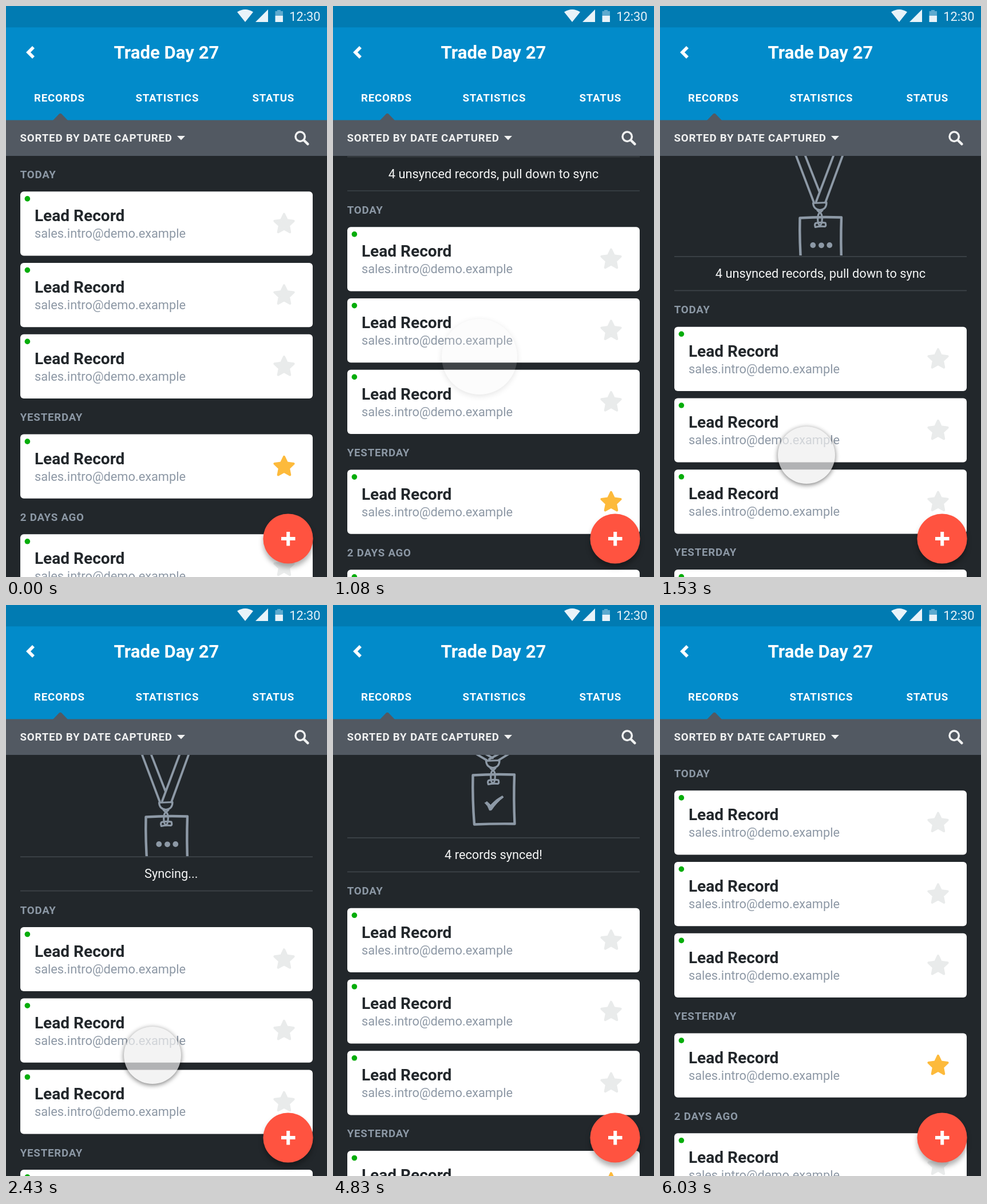
Recreate the animation shown at these times as an HTML page. Size 561 by 998 pixels, loop 6300 ms.

```html
<!DOCTYPE html>
<html lang="en">
<head>
<meta charset="utf-8">
<title>Pull to sync</title>
<style>
  html, body { margin: 0; width: 100%; height: 100%; overflow: hidden; background: #22272b; }
  body { position: relative; font-family: Roboto, sans-serif; }
  svg { position: absolute; left: 0; top: 0; width: 561px; height: 998px; }
  #pull { position: absolute; left: 0; top: 262px; width: 561px; overflow: hidden; }
  #pull svg { top: -262px; fill: none; stroke: #8d99a6; stroke-linecap: round; stroke-linejoin: round; }
  #badge { transform-origin: 281px 340px; }
  #touch { position: absolute; left: 205.5px; top: -50px; width: 100px; height: 100px; border-radius: 50%;
    background: #eee; box-shadow: 0 2px 8px rgba(0, 0, 0, .75); }
  .label { font-weight: 700; font-size: 18.7px; letter-spacing: .8px; }
  .group { fill: #8c98a5; }
  .name { font-weight: 700; font-size: 28.05px; fill: #22272b; }
  .mail { font-size: 21.8px; fill: #8d98a5; }
  .msg { font-size: 21.8px; fill: #f4f5f5; }
  .title { font-weight: 700; font-size: 31.17px; }
  #fab { filter: drop-shadow(0 7px 4px rgba(0, 0, 0, .3)); }
</style>
</head>
<body>
<svg viewBox="0 0 561 998">
  <g id="list">
    <path d="M25 201.5H536M25 261H536" stroke="#3d4348" stroke-width="1.6"/>
    <text id="msg" class="msg" y="238.5"></text>
  </g>
</svg>

<div id="pull">
  <svg id="straps" viewBox="0 0 561 998" stroke-width="3.8"><path/></svg>
  <svg id="badge" viewBox="0 0 561 998">
    <path d="M244.5 297.5Q280 295 317 296.5Q315.5 340 317.5 382.5Q282 382 247 383.5Q243.5 340 244.5 297.5Z" stroke-width="4.4"/>
    <path d="M272 306.5Q281 304.5 289 306Q291 311 288 312.5Q280 311.5 271.5 313.5Q269.5 309 272 306.5Z" stroke-width="3.2"/>
    <g id="dots" fill="#8d99a6" stroke="none">
      <circle cx="267.3" cy="345" r="4.9"/><circle cx="282" cy="345.3" r="4.9"/><circle cx="296.3" cy="345" r="4.9"/>
    </g>
    <path id="check" d="M265.5 346L269 343.5L275.5 349.5Q285 339 296 333.5L298 336Q286 345 277 358.5L273.5 359Q271 351 265.5 346Z" fill="#8d99a6" stroke-width="1"/>
  </svg>
  <svg id="clip" viewBox="0 0 561 998" stroke-width="3.2">
    <path d="M267.5 272.5L291 271.5Q291 283.5 279.5 284.5Q268.5 284 267.5 272.5ZM275 285Q279.5 291 284 285M279.5 289Q283.5 291 283.3 300Q283 311 279.5 311Q275.8 311 275.7 300Q275.8 291 279.5 289Z"/>
  </svg>
</div>

<div id="touch"></div>

<svg viewBox="0 0 561 998">
  <rect width="561" height="200" fill="#028bca"/>
  <rect width="561" height="37.4" fill="#017bb2"/>
  <rect y="199.5" width="561" height="62.5" fill="#525962"/>
  <path d="M82 200L93 188.6Q95 186.8 97 188.6L108 200Z" fill="#525962"/>

  <g fill="#e8f3f9">
    <path d="M404 10.5Q418 1.5 432 10.5L418 28ZM436 28L458 6V28Z"/>
    <path d="M470.5 17H484V28H470.5Z"/>
    <path d="M470.5 17V9H474V7H480V9H484V17Z" opacity=".4"/>
    <text x="495.3" y="25.5" font-size="21.8">12:30</text>
  </g>

  <g fill="#fff">
    <path d="M48 72L39 81L48 90" fill="none" stroke="#fff" stroke-width="5.6"/>
    <text class="title" x="280.5" y="92" text-anchor="middle">Trade Day 27</text>
    <text class="label" x="49" y="167">RECORDS</text>
    <text class="label" x="226.5" y="167">STATISTICS</text>
    <text class="label" x="430.5" y="167">STATUS</text>
  </g>

  <g fill="#f0f1f1">
    <text class="label" x="24.5" y="237">SORTED BY DATE CAPTURED</text>
    <path d="M299 227H313L306 234.5Z"/>
    <g fill="none" stroke="#f0f1f1" stroke-linecap="round">
      <circle cx="514.2" cy="228.3" r="8.2" stroke-width="3.5"/>
      <path d="M521 235L527.5 241.3" stroke-width="4.4"/>
    </g>
  </g>

  <g id="fab">
    <circle cx="493" cy="931" r="43.6" fill="#ff5340"/>
    <path d="M481 931H505.5M493.2 919V943.5" stroke="#fff" stroke-width="6"/>
  </g>
</svg>

<script>
const LOOP = 6300, STEP = 30;
const PEEK = 62, DRAG = 176.6, RELEASE = 33.2, REST = PEEK + DRAG - RELEASE;
const $ = id => document.getElementById(id);

function star(cx, cy, color) {
  const pts = [];
  for (let i = 0; i < 10; i++) {
    const r = i % 2 ? 8.5 : 17.5, a = i * Math.PI / 5;
    pts.push([cx + r * Math.sin(a), cy - r * Math.cos(a)].map(v => v.toFixed(2)));
  }
  return `<polygon points="${pts.join(' ')}" fill="${color}" stroke="${color}" stroke-width="4" stroke-linejoin="round"/>`;
}

const card = (y, color = '#e9ebeb') => `
  <rect x="25" y="${y}" width="511" height="112.2" rx="6" fill="#fff"/>
  <circle cx="37.4" cy="${y + 12.6}" r="4.8" fill="#05ad0a"/>
  <text class="name" x="49.9" y="${y + 52}">Lead Record</text>
  <text class="mail" x="49.9" y="${y + 81}">sales.intro@demo.example</text>
  ${star(486, y + 56.8, color)}`;
const group = (y, text) => `<text class="label group" x="24.7" y="${y}">${text}</text>`;

$('list').insertAdjacentHTML('beforeend',
  group(301, 'TODAY') + card(324.3) + card(449) + card(573.8) +
  group(725, 'YESTERDAY') + card(748.5, '#fdba3b') +
  group(900, '2 DAYS AGO') + card(923.2));

// Cubic bezier (.4, 0, .2, 1)
function ease(x) {
  let lo = 0, hi = 1, s;
  for (let i = 0; i < 20; i++) {
    s = (lo + hi) / 2;
    const bx = 1.2 * (1 - s) ** 2 * s + .6 * (1 - s) * s * s + s ** 3;
    if (bx < x) lo = s; else hi = s;
  }
  return 3 * s * s - 2 * s ** 3;
}
const span = (t, a, b) => Math.min(1, Math.max(0, (t - a) / (b - a)));
const move = (t, a, b) => t <= a ? 0 : t >= b ? 1 : ease(span(t, a, b));

// Half turn in seven steps of 60 ms
function flipAngle(t) {
  for (const start of [3270, 3870, 4470]) {
    const k = Math.floor((t - start) / 60) + 1;
    if (k > 0 && k < 7) return k * 180 / 7;
  }
  return 0;
}

function setMessage(t) {
  const syncing = t >= 2430 && t < 4680;
  const msg = $('msg');
  msg.textContent = syncing ? 'Syncing...'
    : t < 2430 ? '4 unsynced records, pull down to sync' : '4 records synced!';
  msg.setAttribute('x', syncing ? 242 : 280.5);
  msg.setAttribute('text-anchor', syncing ? 'start' : 'middle');
}

function draw(t) {
  const peek = move(t, 0, 330), drag = move(t, 1176, 1590);
  const release = move(t, 2610, 3030), close = move(t, 5700, 6030);
  const offset = PEEK * peek + DRAG * drag - RELEASE * release - REST * close;

  $('list').setAttribute('transform', `translate(0 ${offset.toFixed(2)})`);
  $('pull').style.height = Math.max(0, offset - PEEK) + 'px';
  setMessage(t);

  // The lanyard follows the drag at half speed until it meets the badge
  const lift = 73 * (1 - release) - REST * close;
  const hook = lift - 83 * (1 - drag);
  const top = 262 - 9 * release - REST * close, h = 271.5 + hook;
  const mid = top + (h - top) * .78;
  $('straps').firstElementChild.setAttribute('d',
    `M238 ${top}L269 ${h}M254 ${top}L279 ${mid}M303 ${top}L273 ${h - 2}M319 ${top}L289 ${h}`);
  $('clip').style.transform = `translateY(${hook}px)`;

  const angle = flipAngle(t), back = angle > 90;
  $('badge').style.transform =
    `translateY(${lift}px) perspective(185px) rotateY(${back ? angle - 180 : angle}deg)`;
  const done = t >= 4830 || (t > 4470 && back);
  $('dots').style.display = done ? 'none' : '';
  $('check').style.display = done ? '' : 'none';

  const press = span(t, 1050, 1200) - span(t, 2610, 2760);
  const touchY = 613 + 174 * move(t, 1168, 1590);
  $('touch').style.opacity = .7 * press;
  $('touch').style.transform = `translateY(${touchY}px) scale(${1.4 - .4 * press})`;
}

const begin = performance.now();
function tick() {
  const t = (performance.now() - begin) % LOOP;
  draw(Math.floor(t / STEP) * STEP);
  requestAnimationFrame(tick);
}
tick();
</script>
</body>
</html>
```
